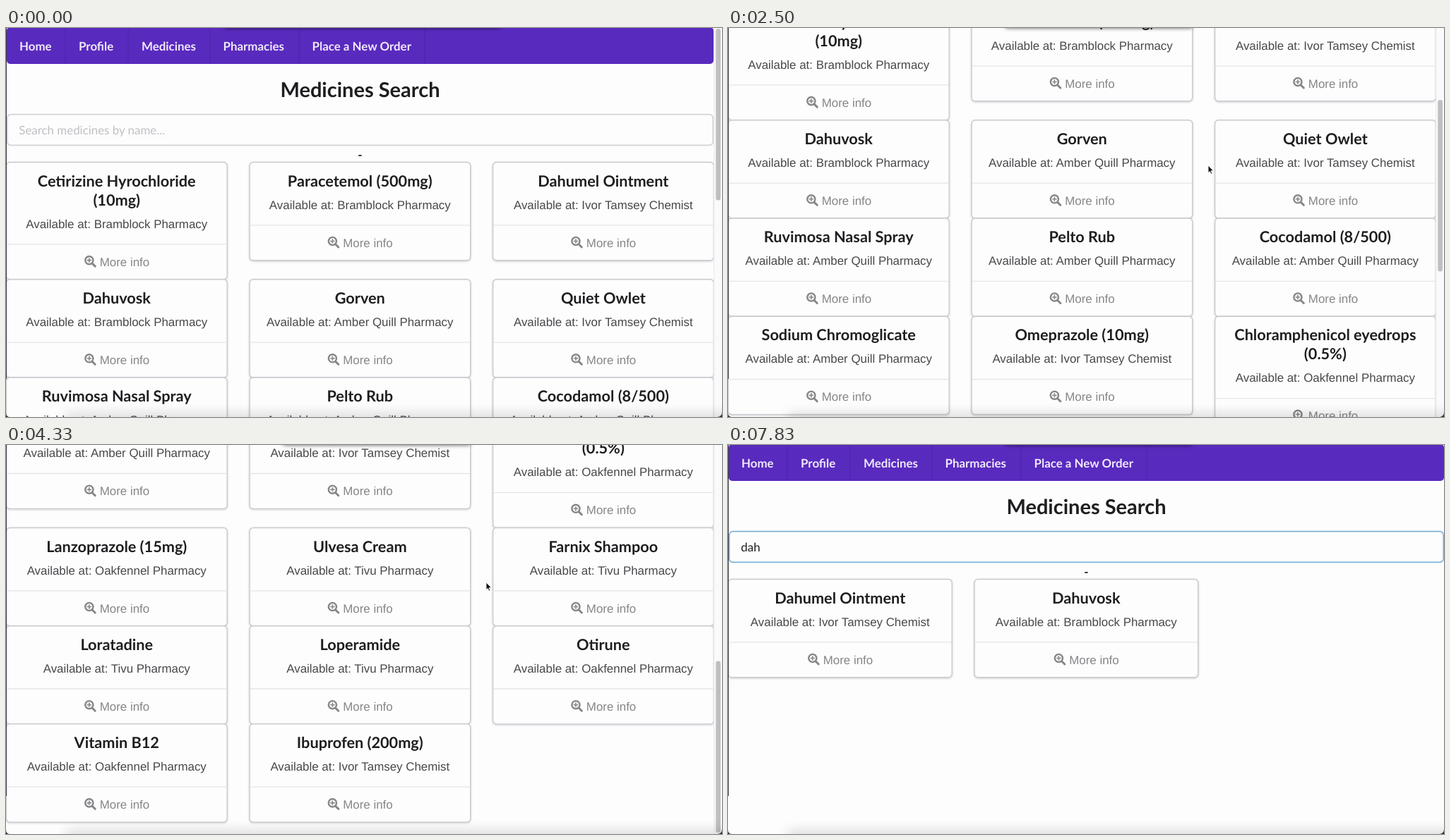
An HTML page that plays this animation: 1014x552 px, repeating every 8000 ms.

```html
<!DOCTYPE html>
<html lang="en">
<head>
<meta charset="utf-8">
<title>Medicines Search</title>
<style>
  html, body { margin: 0; width: 100%; height: 100%; overflow: hidden; background: #fefdfe; }
  svg { display: block; width: 100%; height: 100%; }
  text { text-rendering: geometricPrecision; white-space: pre; }
  .lato { font-family: Lato, sans-serif; font-size: 16.9px; }
  .bold { font-weight: 700; fill: #1e1e20; }
  .sans { font-family: "Liberation Sans", Arial, sans-serif; font-size: 16.9px; }
  .mid { text-anchor: middle; }
  .nav { font-weight: 700; fill: #f0eafa; }
  .title { font-size: 29px; }
  .name { font-size: 21.7px; }
  .where { fill: #48474a; }
  .more { fill: #868588; }
  .icon { fill: none; stroke: #868588; stroke-linecap: round; }
  .card { fill: #fefdfe; stroke: #cbcace; stroke-width: 1.4; filter: drop-shadow(0 1.2px 1.5px #d0cfd2); }
  .rule { stroke: #e5e4e7; stroke-width: 1.3; }
  #pill { fill: #fefdfe; filter: drop-shadow(0 2px 2.5px rgba(0, 0, 0, .5)); }
  #dock { fill: #000; opacity: .12; filter: blur(8px); }
</style>
</head>
<body>
<svg viewBox="0 0 1014 552" preserveAspectRatio="none">
  <g id="page"></g>
  <g id="bar">
    <rect x="1002.5" width="12" height="552" fill="#faf9fb"/>
    <path d="M1002.7 0V552" stroke="#e8e7e9"/>
    <rect id="thumb" x="1005.3" width="6.7" rx="3.3" fill="#c0bec1"/>
  </g>
  <rect id="dock" x="85" y="546" width="1000" height="60"/>
  <rect id="pill" y="-30" height="28.8" rx="7"/>
  <path d="M.5 0V498" stroke="#3a3940"/>
  <path d="M0 546Q0 552 6 552H0ZM1014 545Q1014 552 1007 552H1014Z" fill="#2a2930"/>
  <path id="cursor" d="M0 0V10.6L2.4 8.4L4 12.2L5.8 11.4L4.2 7.7H7.5Z" fill="#111" stroke="#fff" stroke-width=".9"/>
</svg>
<script>
const STAGE_W = 1014, STAGE_H = 552, STEPS = 48, LOOP = 8000;
const ROW = 139.2, LINE = 27.1, TOP = 190.5, GAP = 31.7, BOTTOM = 17;

const shops = {
  b: 'Bramblock Pharmacy', i: 'Ivor Tamsey Chemist', a: 'Amber Quill Pharmacy',
  o: 'Oakfennel Pharmacy', t: 'Tivu Pharmacy'
};
// "|" marks a line break in the card heading
const medicines = [
  ['Cetirizine Hyrochloride|(10mg)', 'b'], ['Paracetemol (500mg)', 'b'], ['Dahumel Ointment', 'i'],
  ['Dahuvosk', 'b'], ['Gorven', 'a'], ['Quiet Owlet', 'i'],
  ['Ruvimosa Nasal Spray', 'a'], ['Pelto Rub', 'a'], ['Cocodamol (8/500)', 'a'],
  ['Sodium Chromoglicate', 'a'], ['Omeprazole (10mg)', 'i'], ['Chloramphenicol eyedrops|(0.5%)', 'o'],
  ['Lanzoprazole (15mg)', 'o'], ['Ulvesa Cream', 't'], ['Farnix Shampoo', 't'],
  ['Loratadine', 't'], ['Loperamide', 't'], ['Otirune', 'o'],
  ['Vitamin B12', 'o'], ['Ibuprofen (200mg)', 'i']
].map(([name, shop]) => ({ lines: name.split('|'), shop: shops[shop] }));

const navItems = [['Home', 20, 84], ['Profile', 104, 173], ['Medicines', 193, 289],
  ['Pharmacies', 308.5, 415], ['Place a New Order', 434.5, 593]];

// Tables of [step, value]
const scrollKeys = [[6, 0], [8, 30.5], [15, 226], [19, 363.5], [26, 684], [27, 684],
  [29, 130], [30, -33.5], [31, -18], [32, -6], [33, 0]];
const cursorX = [[2, 640], [5, 680]];
const cursorY = [[2, 150], [3, 150], [5, 195]];
const queryKeys = [[0, ''], [38, 'd'], [41, 'da'], [44, 'dah']];
const FOCUS = 3, CURSOR_ON = 2, PILL_SHRINK = 3;

const $ = id => document.getElementById(id);
const text = (cls, x, y, str) => `<text class="${cls}" x="${x}" y="${y}">${str}</text>`;

function lerpKeys(keys, s) {
  if (s <= keys[0][0]) return keys[0][1];
  for (let i = 1; i < keys.length; i++) {
    const [s0, a] = keys[i - 1], [s1, b] = keys[i];
    if (s <= s1) return a + (b - a) * (s - s0) / (s1 - s0);
  }
  return keys[keys.length - 1][1];
}
const holdKeys = (keys, s) => keys.filter(k => k[0] <= s).pop()[1];

function drawCard({ lines, shop }, x, y, w) {
  const extra = (lines.length - 1) * LINE, c = w / 2 + .3;
  const names = lines.map((l, i) => text('lato bold name mid', c, 34.2 + i * LINE, l)).join('');
  return `<g transform="translate(${x} ${y})">
    <rect class="card" x=".5" width="${w - .2}" height="${ROW + extra}" rx="5"/>${names}
    ${text('sans where mid', c, 66 + extra, 'Available at: ' + shop)}
    <path class="rule" d="M1.2 ${89.3 + extra}H${w - .4}"/>
    <g class="icon" transform="translate(${c - 38.9} ${112 + extra})">
      <circle r="5.6" stroke-width="2.4"/>
      <path d="M4.6 4.8L8.4 8.5" stroke-width="3"/>
      <path d="M-2.6 0H2.6M0 -2.6V2.6" stroke-width="1.6"/>
    </g>
    ${text('sans more', c - 24, 120 + extra, 'More info')}
  </g>`;
}

function layout(query) {
  const found = medicines.filter(m => m.lines.join(' ').toLowerCase().includes(query));
  const rows = [];
  for (let i = 0; i < found.length; i += 3) rows.push(found.slice(i, i + 3));
  const heights = rows.map(r => ROW + LINE * (Math.max(...r.map(m => m.lines.length)) - 1));
  const height = TOP + heights.reduce((a, b) => a + b, 0) + BOTTOM;
  return { rows, heights, height, scrolls: height > STAGE_H };
}

function drawPage({ rows, heights, scrolls }, query, focused) {
  const width = scrolls ? 1002 : STAGE_W, mid = width / 2 + .5;
  const cardW = (width - 2 * GAP) / 3;
  let out = `<rect x="1" y="-1.3" width="${width - 1}" height="52.3" rx="5" fill="#592abe"/>`;
  for (const [label, x, edge] of navItems) {
    out += text('lato nav', x - 1, 32, label) +
      `<path d="M${edge} -1V51" stroke="#5025ad" stroke-width="1.2"/>`;
  }
  out += text('lato bold title mid', mid, 97.5, 'Medicines Search');
  out += `<rect x="1.8" y="122.6" width="${width - 2.6}" height="43.8" rx="5" fill="#fefdfe"
    stroke="${focused ? '#7db1d6' : '#d3d2d6'}" stroke-width="1.6"/>`;
  const ink = query ? '#1e1e20' : focused ? '#77767a' : '#bfbec2';
  out += `<g fill="${ink}">${text('lato', 18.3, 151.2, query || 'Search medicines by name...')}</g>`;
  out += text('lato bold mid', mid, 186, '-');
  let y = TOP;
  rows.forEach((row, r) => {
    row.forEach((m, i) => { out += drawCard(m, i * (cardW + GAP), y, cardW); });
    y += heights[r];
  });
  $('page').innerHTML = out;
}

let drawn = '', view;

function render(step) {
  const query = holdKeys(queryKeys, step), focused = step >= FOCUS;
  const key = query + focused;
  if (key !== drawn) {
    drawn = key;
    view = layout(query);
    drawPage(view, query, focused);
  }
  const scroll = lerpKeys(scrollKeys, step);
  $('page').setAttribute('transform', `translate(0 ${-scroll})`);

  const ratio = STAGE_H / view.height;
  $('bar').style.display = view.scrolls ? '' : 'none';
  $('thumb').setAttribute('y', 1 + Math.max(0, scroll) * ratio);
  $('thumb').setAttribute('height', STAGE_H * ratio - 3);

  const wide = step < PILL_SHRINK;
  $('pill').setAttribute('x', wide ? 307 : 390);
  $('pill').setAttribute('width', wide ? 396 : 270);

  $('cursor').style.display = step >= CURSOR_ON && !query ? '' : 'none';
  $('cursor').setAttribute('transform',
    `translate(${lerpKeys(cursorX, step)} ${lerpKeys(cursorY, step)})`);
}

const start = performance.now();
function tick() {
  const t = (performance.now() - start) % LOOP;
  render(Math.floor((t + 5) * STEPS / LOOP) % STEPS);
  requestAnimationFrame(tick);
}
tick();
</script>
</body>
</html>
```
